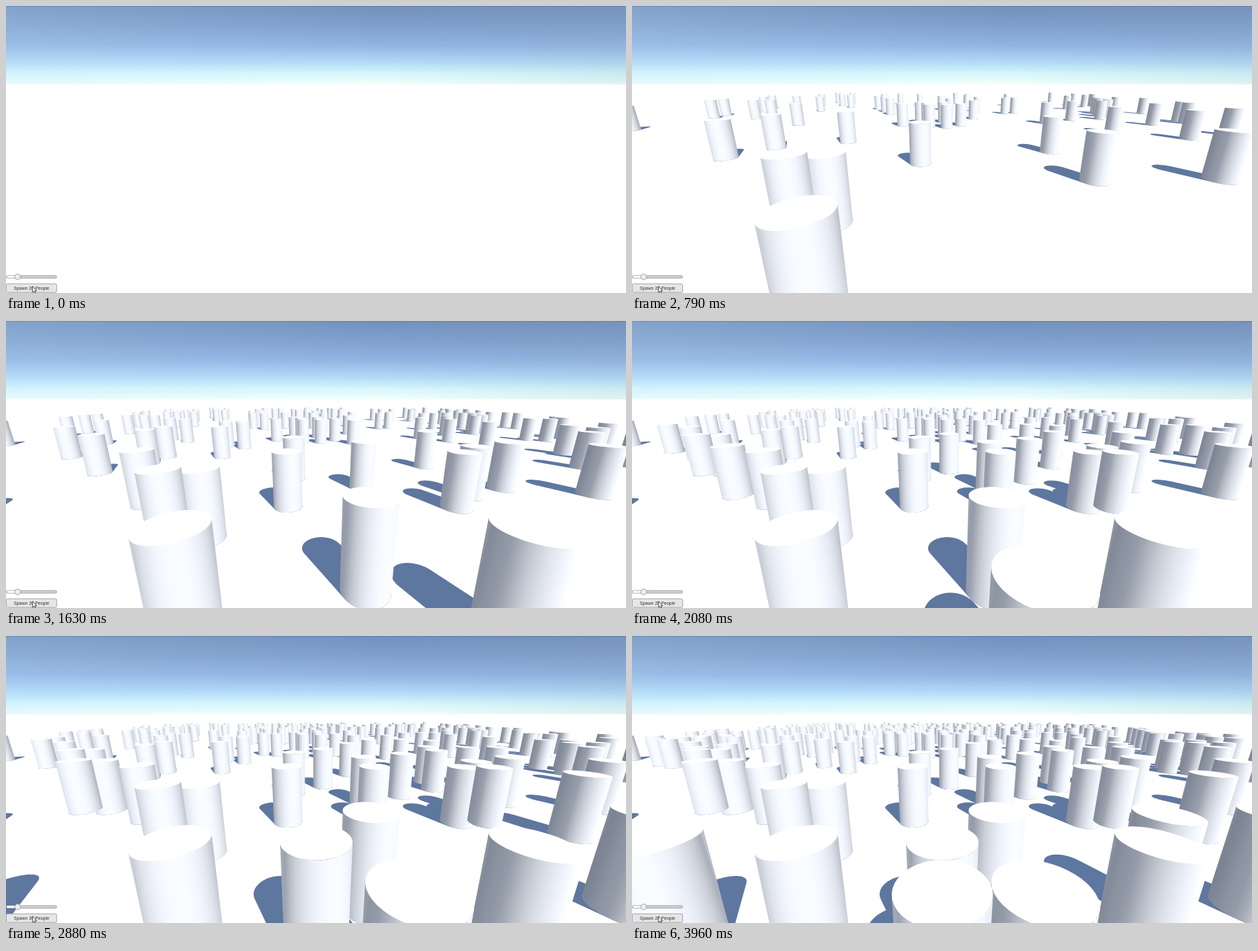
An HTML page with a canvas for the animation above (4290 ms loop, 959 by 445 pixels).

```html
<!DOCTYPE html>
<html lang="en">
<head>
<meta charset="utf-8">
<title>Crowd spawner</title>
<style>
html, body { margin: 0; width: 100%; height: 100%; overflow: hidden; background: #fff; }
canvas, svg { position: absolute; left: 0; top: 0; width: 100%; height: 100%; }
text { font: 7px "Liberation Sans", Arial, sans-serif; fill: #323232; text-anchor: middle; }
</style>
</head>
<body>
<canvas id="scene" width="959" height="445"></canvas>
<svg viewBox="0 0 959 445">
  <g stroke="#8c8c90" stroke-width=".8">
    <rect x=".4" y="418" width="78" height="4" rx="2" fill="#d2d2d4"/>
    <path d="M2 418.4H18V421.6H2Q.6 420 2 418.4Z" fill="#fff" stroke="none"/>
    <circle cx="18" cy="420" r="4.4" fill="#ededef"/>
    <rect x=".4" y="430.8" width="78" height="13.4" rx="2" fill="#e6e6e8"/>
  </g>
  <text x="39.5" y="440">Spawn 20 People</text>
  <path d="M41 434.5V444L43 442.2L44.4 445.4L46 444.7L44.6 441.6H47.4Z" fill="#f4f4f4" stroke="#222" stroke-width=".8"/>
</svg>
<script>
const W = 959, HT = 445, CX = W / 2, CY = HT / 2, LOOP = 4290;
const ctx = document.getElementById("scene").getContext("2d");

// Camera: 60 degree vertical field of view, pitched down, above a flat floor
const F = CY / Math.tan(Math.PI / 6), PITCH = 14.8 * Math.PI / 180;
const COS = Math.cos(PITCH), SIN = Math.sin(PITCH);
const EYE = 3.7, TALL = 2, R = 0.5, HORIZON = 121.5;

// Sun: 50 degrees high, behind the camera on the right
const SUN = -Math.PI / 3, SUN_SIDE = Math.cos(50 * Math.PI / 180);
const CAST = TALL / Math.tan(50 * Math.PI / 180);
const SHADE = { x: -CAST * 0.5, d: CAST * 0.866 };

// Bursts of evenly spaced spawns: first ms, last ms, count
const spawnTimes = [
  [290, 790, 10], [830, 1080, 5], [1330, 1750, 5], [1880, 2330, 5],
  [2580, 2880, 4], [3040, 3210, 3], [3380, 3540, 3], [3710, 3960, 4]
].flatMap(([a, b, n]) => Array.from({ length: n }, (_, i) => a + (b - a) * i / (n - 1)));

const people = [];

// Nearby cylinders, each given by the screen position of its top's centre
function spawn(first, last, tops) {
  tops.forEach(([x, y], i) => {
    const d = (EYE - TALL) / Math.tan(PITCH + Math.atan((y - CY) / F));
    const z = d * COS + (EYE - TALL) * SIN;
    people.push({ x: (x - CX) / F * z, d, step: first + i % (last - first + 1) });
  });
}
spawn(1, 10, [[258, 317], [298, 228], [236, 229], [132, 176], [445, 180], [727, 194], [931, 193]]);
spawn(11, 18, [
  [203, 200], [434, 202], [564, 272], [815, 320], [553, 187], [709, 203], [779, 188], [-111, 215]
]);
spawn(20, 22, [[100, 176], [148, 193], [755, 203], [570, 202], [613, 182], [634, 391]]);
spawn(24, 26, [[1002, 276], [-170, 313], [666, 177]]);
spawn(27, 33, [[480, 316], [105, 193], [898, 214]]);
spawn(34, 39, [[480, 391], [34, 316], [828, 276]]);

// The distant crowd, kept from overlapping
let seed = 11;
const rand = () => (seed = (seed * 16807) % 2147483647) / 2147483647;
for (let step = 1; step <= spawnTimes.length; step++)
  for (let i = 0; i < 7; i++) {
    const c = { x: -26 + 52 * rand(), d: 12.5 + 39.5 * rand(), step };
    if (people.every(p => Math.hypot(p.x - c.x, p.d - c.d) > 2 * R)) people.push(c);
  }

people.sort((a, b) => b.d - a.d);

function project(x, d, drop) {
  const z = d * COS + drop * SIN;
  return [CX + F * x / z, CY + F * (drop * COS - d * SIN) / z];
}

function arc(c, from, to, drop, n = 24) {
  return Array.from({ length: n + 1 }, (_, i) => {
    const t = from + (to - from) * i / n;
    return project(c.x + R * Math.cos(t), c.d + R * Math.sin(t), drop);
  });
}

function fill(points, style) {
  ctx.fillStyle = style;
  ctx.beginPath();
  points.forEach(p => ctx.lineTo(...p));
  ctx.fill();
}

function gradient(x0, y0, x1, y1, stops) {
  const g = ctx.createLinearGradient(x0, y0, x1, y1);
  stops.forEach(([at, color]) => g.addColorStop(at, color));
  return g;
}

function drawSky() {
  const paint = (style, h = HORIZON) => { ctx.fillStyle = style; ctx.fillRect(0, 0, W, h); };
  paint(gradient(0, 0, 0, HORIZON, [
    [0, "#7390bc"], [0.25, "#809fcd"], [0.5, "#92b4e2"],
    [0.72, "#b4daf8"], [0.86, "#d6f7fb"], [1, "#f4fffd"]
  ]));
  paint(gradient(0, 0, W, 0, [[0, "rgba(190,230,255,.2)"], [0.6, "rgba(190,230,255,0)"]]));
  paint(gradient(0, 0, W, 0, [[0.6, "rgba(130,160,180,0)"], [1, "rgba(130,160,180,.15)"]]));
  paint("rgba(60,80,110,.3)", 1);
}

function drawShadow(c) {
  const tip = { x: c.x + SHADE.x, d: c.d + SHADE.d };
  const away = Math.atan2(SHADE.d, SHADE.x), q = Math.PI / 2;
  fill([...arc(c, away + q, away + 3 * q, EYE), ...arc(tip, away - q, away + q, EYE)], "#5e779f");
}

// Ambient, sunlight and grazing sky reflection, summed in linear light
function sideColor(t, facing, sheen) {
  const sun = Math.cos(t - SUN);
  const light = 0.15 * (1 + sun) + 0.75 * SUN_SIDE * Math.max(0, sun)
    + sheen * (1 - Math.max(0, Math.cos(t - facing))) ** 3;
  const rgb = [0.17, 0.2, 0.265].map(v => Math.round(255 * Math.min(1, v + light) ** (1 / 2.2)));
  return `rgb(${rgb})`;
}

function drawCylinder(c) {
  const facing = Math.atan2(-c.d, -c.x);
  const half = Math.acos(R / Math.hypot(c.x, c.d));
  const from = facing - half, to = facing + half, low = EYE, high = EYE - TALL;
  const mid = arc(c, from, to, EYE - TALL / 2, 16);
  const [lx, ly] = mid[0], [rx, ry] = mid[16];

  // Shade across the screen direction perpendicular to the axis
  const a = project(c.x, c.d, high), b = project(c.x, c.d, low);
  const nx = b[1] - a[1], ny = a[0] - b[0];
  const across = (x, y) => (x - lx) * nx + (y - ly) * ny;
  const span = across(rx, ry), k = span / (nx * nx + ny * ny);
  const sheen = 0.3 * (1 - 0.8 * Math.min(1, Math.max(0, lx / W)));
  const stops = mid.map(([x, y], i) => [
    Math.min(1, Math.max(0, across(x, y) / span)),
    sideColor(from + (to - from) * i / 16, facing, sheen)
  ]);
  fill([...arc(c, from, to, low), ...arc(c, to, from, high)],
    gradient(lx, ly, lx + nx * k, ly + ny * k, stops));
  fill(arc(c, 0, 2 * Math.PI, high, 40), "#fff");
}

let shown = -1;
function frame() {
  const t = performance.now() % LOOP;
  const step = spawnTimes.filter(s => s <= t).length;
  if (step !== shown) {
    shown = step;
    ctx.fillStyle = "#fff";
    ctx.fillRect(0, 0, W, HT);
    drawSky();
    const present = people.filter(c => c.step <= step);
    present.forEach(drawShadow);
    present.forEach(drawCylinder);
  }
  requestAnimationFrame(frame);
}
frame();
</script>
</body>
</html>
```
